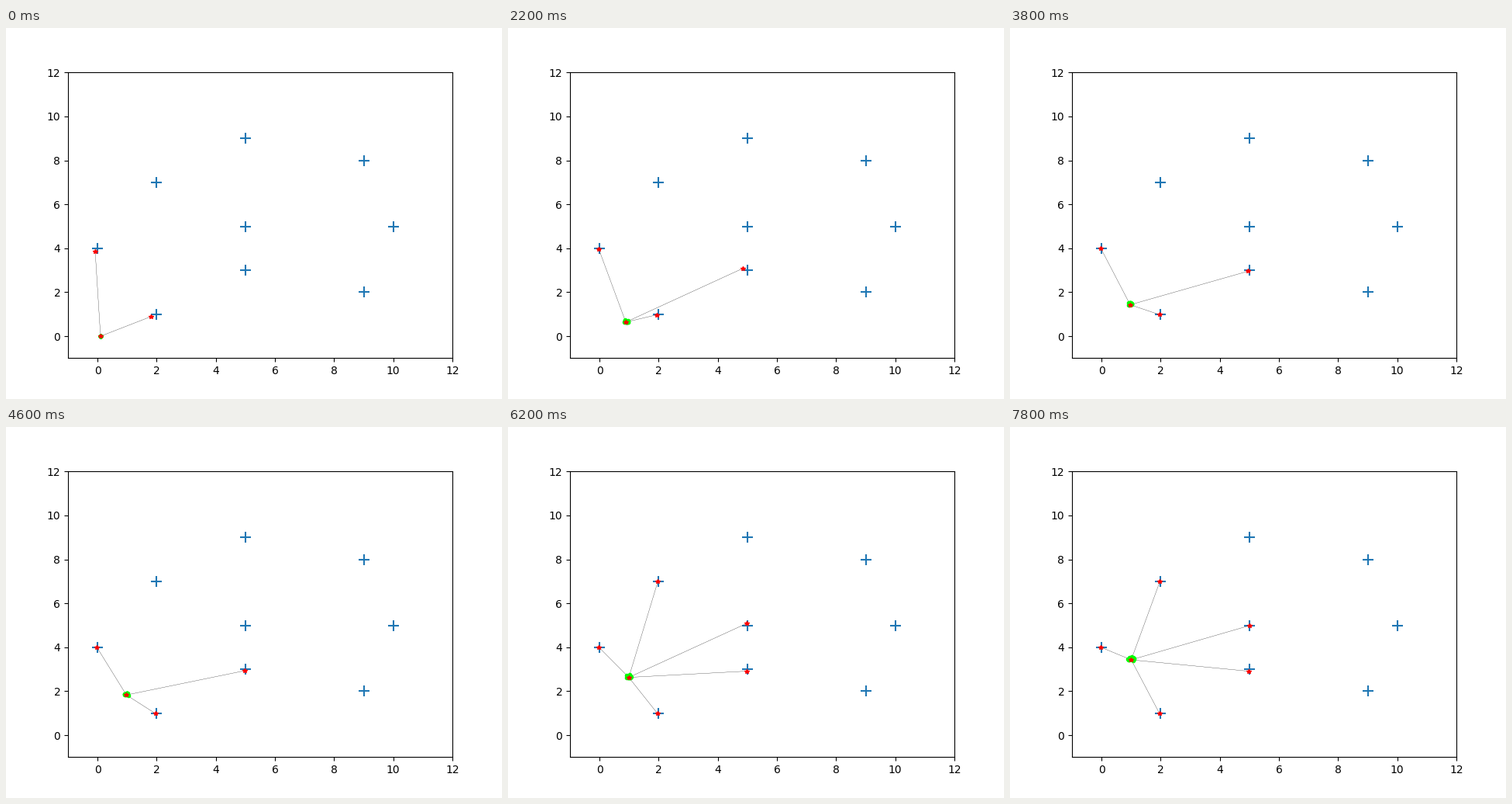
A matplotlib script that plays this animation: 640 by 478 pixels, repeating every 8 s.

```python
import numpy as np
import matplotlib.pyplot as plt
from matplotlib.animation import FuncAnimation

FRAMES, INTERVAL = 40, 200
SENSOR_RANGE = 5.0
STEP = 0.1          # distance per frame
LAG = 0.4           # best particle trails the robot by this many frames
SETTLE = 6          # frames over which an estimate settles
N_PARTICLES = 20

landmarks = np.array([(0, 4), (2, 1), (5, 3), (5, 5), (2, 7), (9, 2),
                      (10, 5), (9, 8), (5, 9)], float)

# Estimation error of each tracked landmark: at first sight, once settled
errors = np.array([[(-.08, -.15), (-.02, 0)],
                   [(-.2, -.11), (-.04, -.01)],
                   [(-.25, .2), (-.01, -.09)],
                   [(-.1, .3), (0, -.05)],
                   [(-.03, 0), (-.025, 0)]])

# Constant speed; the heading turns until it points almost straight up
frames = np.arange(FRAMES)
heading = np.radians(np.minimum(89, 10 + 5.5 * (frames[:-1] + 0.5)))
moves = STEP * np.column_stack([np.cos(heading), np.sin(heading)])
path = np.vstack([(0.1, 0), (0.1, 0) + np.cumsum(moves, axis=0)])


def robot(t):
    return np.array([np.interp(t, frames, p) for p in path.T])


def first_seen(landmark):
    near = np.hypot(*(landmark - path).T) < SENSOR_RANGE
    return near.argmax()


def estimate(landmark, error, age):
    first, settled = error
    return landmark + settled + (first - settled) * np.exp(-age / SETTLE)


def particles(i):
    noise = np.random.default_rng(i).uniform(-1, 1, (N_PARTICLES, 2))
    noise /= np.hypot(*noise.T).max()
    spread = np.array([0.06, 0.06]) + np.array([0.05, 0.03]) * i / FRAMES
    return robot(i) + noise * spread * min(1, 0.2 + i / 8)


tracked = [(p, e, first_seen(p)) for p, e in zip(landmarks, errors)]

fig, ax = plt.subplots(figsize=(6.4, 4.78), dpi=100)
ax.set(xlim=(-1, 12), ylim=(-1, 12))
ax.scatter(*landmarks.T, s=100, marker="+", c="C0")
rays = [ax.plot([], [], color="black", lw=0.2)[0] for _ in tracked]
cloud, = ax.plot([], [], "o", color="lime", ms=3)
stars, = ax.plot([], [], "*", color="red", ms=4)


def update(i):
    cloud.set_data(*particles(i).T)
    best = robot(i - LAG)
    points = [best]
    for ray, (landmark, error, start) in zip(rays, tracked):
        ray.set_visible(bool(i >= start))
        if i >= start:
            guess = estimate(landmark, error, i - start)
            ray.set_data(*zip(best, guess))
            points.append(guess)
    stars.set_data(*zip(*points))
    return [*rays, cloud, stars]


anim = FuncAnimation(fig, update, frames=FRAMES, interval=INTERVAL,
                     repeat=True, repeat_delay=0)
plt.show()
```
